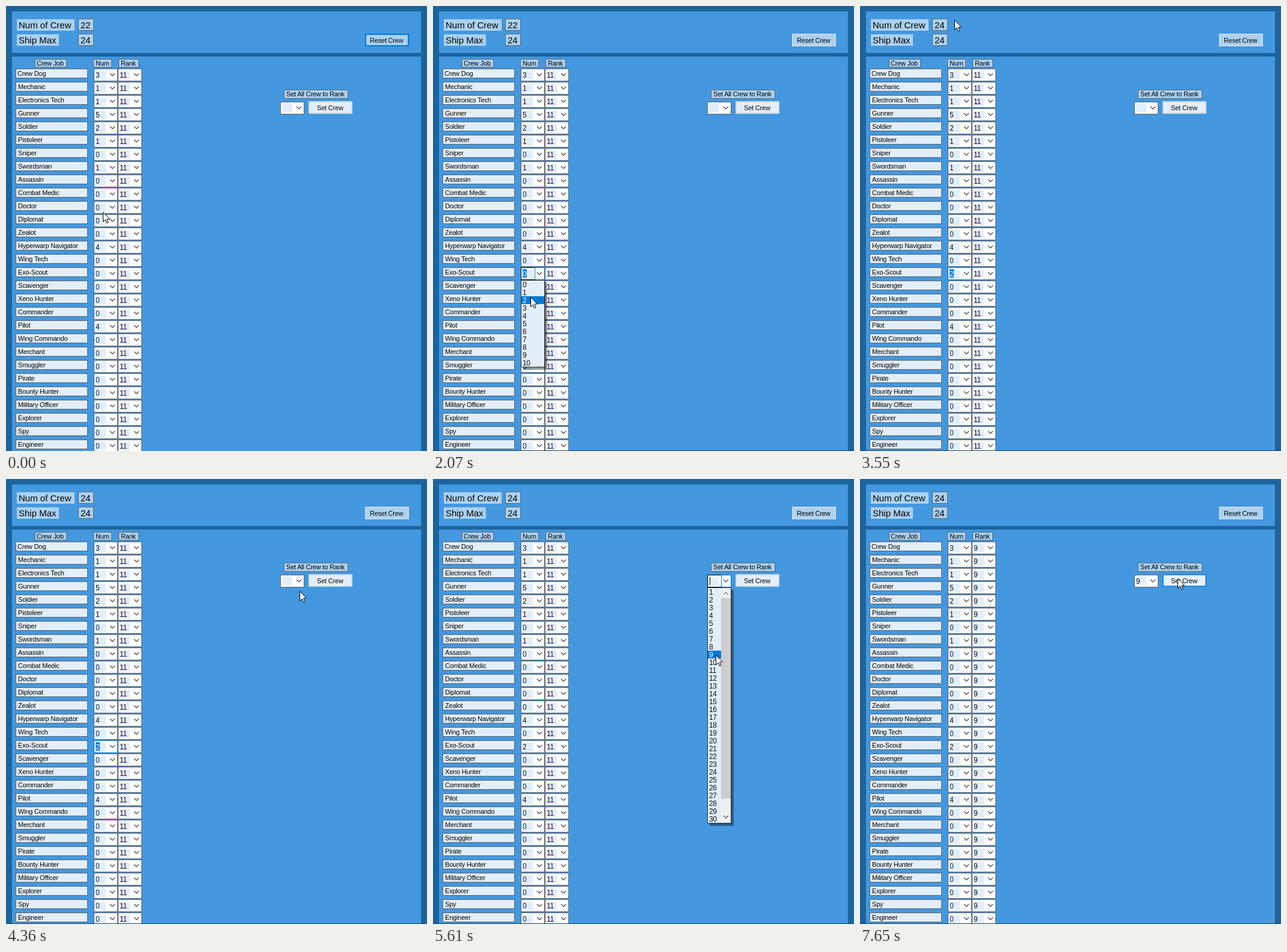
Write an HTML page that moves like this. It is 700 by 739 pixels and loops after 8 s.

```html
<!DOCTYPE html>
<html lang="en">
<head>
<meta charset="utf-8">
<title>Crew editor</title>
<style>
html, body { margin: 0; width: 100%; height: 100%; overflow: hidden; background: #1d649f; }
svg { display: block; }
text { font: 11px "Liberation Sans", Arial, sans-serif; letter-spacing: -0.2px; fill: #000; white-space: pre; }
.big { font-size: 15px; letter-spacing: 0; }
.num { font-size: 12px; letter-spacing: -0.3px; }
</style>
</head>
<body>
<svg id="stage" width="700" height="739" viewBox="0 0 700 739"></svg>
<script>
const LOOP = 8000;
const DARK = "#1d649f", PANEL = "#4398df", LABEL = "#abd1f0", FIELD = "#e2eefa";
const GREY = "#646464", ACCENT = "#0078d7";
const JOBS = ["Crew Dog", "Mechanic", "Electronics Tech", "Gunner", "Soldier", "Pistoleer", "Sniper",
  "Swordsman", "Assassin", "Combat Medic", "Doctor", "Diplomat", "Zealot", "Hyperwarp Navigator",
  "Wing Tech", "Exo-Scout", "Scavenger", "Xeno Hunter", "Commander", "Pilot", "Wing Commando",
  "Merchant", "Smuggler", "Pirate", "Bounty Hunter", "Military Officer", "Explorer", "Spy", "Engineer"];
const COUNTS = { 0: 3, 1: 1, 2: 1, 3: 5, 4: 2, 5: 1, 7: 1, 13: 4, 19: 4 };
const SCOUT = 15, ROW = 22, TOP = 104, ITEM = 13;

// Screen refreshes: first time, last time, number of steps
const BURSTS = [[140, 950, 7], [1260, 2220, 8], [2500, 3400, 8], [3550, 4510, 8],
  [4630, 5610, 8], [5760, 6700, 7], [7110, 7250, 2]];

// Pointer path: time, x, y
const PATH = [[0, 161, 342], [950, 172, 452], [1397, 179, 445], [1535, 179, 445], [2220, 160, 487],
  [2500, 160, 487], [2886, 97, 143], [3015, 110, 50], [3143, 183, 0], [3272, 160, 20], [3400, 124, 11],
  [4236, 514, 150], [4373, 488, 186], [4510, 498, 176], [4630, 504, 170], [4770, 491, 167],
  [5190, 491, 167], [5610, 470, 292], [6074, 470, 292], [6700, 528, 165], [LOOP, 528, 165]];

const stage = document.getElementById("stage");

function el(parent, tag, attrs) {
  const node = document.createElementNS("http://www.w3.org/2000/svg", tag);
  set(node, attrs);
  parent.appendChild(node);
  return node;
}
function set(node, attrs) {
  for (const key in attrs) node.setAttribute(key, attrs[key]);
}
function rect(parent, x, y, width, height, fill) {
  return el(parent, "rect", { x, y, width, height, fill });
}
function frame(parent, x, y, w, h, fill, stroke) {
  const node = rect(parent, x + 0.5, y + 0.5, w - 1, h - 1, fill);
  node.setAttribute("stroke", stroke);
  return node;
}
function text(parent, x, y, str, cls = "") {
  const node = el(parent, "text", { x, y, class: cls });
  node.textContent = str;
  return node;
}
function show(node, on) {
  node.setAttribute("visibility", on ? "visible" : "hidden");
}
function chevron(parent, x, y) {
  el(parent, "path", { d: `M${x - 4} ${y - 2}l4 4l4 -4`, fill: "none", stroke: "#404040", "stroke-width": 1.2 });
}
function label(x, y, w, h, str, tx) {
  frame(stage, x, y, w, h, LABEL, GREY);
  text(stage, tx, y + 11, str);
}

function makeCombo(x, y, value) {
  const box = frame(stage, x, y, 40, 21, "#fff", GREY);
  rect(stage, x + 3, y + 4, 17, 14, FIELD);
  const button = frame(stage, x + 23, y, 17, 21, "#fff", ACCENT);
  const mark = rect(stage, x + 3, y + 3, 7, 14, ACCENT);
  const digits = text(stage, x + 3, y + 14.5, value, "num");
  chevron(stage, x + 31, y + 10);
  const combo = { box, button, mark, digits };
  setCombo(combo, value);
  return combo;
}
function setCombo(c, value, edge = GREY, selected = false, hot = false) {
  value = String(value);
  const ink = value === "0" ? "#06305a" : value[0] === "1" ? "#26083a" : "#08131f";
  if (c.digits.textContent !== value) c.digits.textContent = value;
  c.digits.style.fill = selected ? "#fff" : ink;
  c.box.setAttribute("stroke", edge);
  show(c.mark, selected);
  show(c.button, hot);
}

function makeButton(x, y, str, tx, fill) {
  const box = rect(stage, x + 1, y + 1, 71, 19, fill);
  box.setAttribute("stroke-width", 2);
  text(stage, tx, y + 15, str);
  return box;
}

function makeList(x, y, first, count, bar) {
  const height = count * ITEM + 2;
  const shadow = rect(stage, x + 4, y + 4, 40, 0, "#000");
  shadow.setAttribute("opacity", 0.4);
  const view = el(stage, "svg", { x, y, width: 40, height: 0, overflow: "hidden" });
  const body = el(view, "g", {});
  frame(body, 0, 0, 40, height, FIELD, "#333");
  const bandFill = rect(body, 1, 0, bar ? 22 : 38, ITEM, ACCENT);
  const items = [];
  for (let i = 0; i < count; i++) items.push(text(body, 3, i * ITEM + 11.5, first + i, "num"));
  if (bar) {
    rect(body, 23, 1, 16, height - 2, "#f0f0f0");
    rect(body, 23, 18, 16, height - 59, "#cdcdcd");
    chevron(body, 31, 10);
    chevron(body, 31, height - 11);
    el(body, "path", { d: "M26 6h10v8h-10z", fill: "#f0f0f0" });
    el(body, "path", { d: "M27 12l4 -4l4 4", fill: "none", stroke: "#404040" });
  }
  return { x, y, height, shadow, view, body, bandFill, items };
}
// Opens by sliding its lower part down from under the box
function setList(list, open, part, pointer) {
  show(list.view, open);
  show(list.shadow, open);
  show(list.bandFill, false);
  if (!open) return;
  const shown = Math.round(list.height * Math.min(1, part));
  set(list.view, { height: shown });
  set(list.shadow, { height: shown });
  set(list.body, { transform: `translate(0 ${shown - list.height})` });
  const at = part >= 1 ? Math.floor((pointer.y - list.y - 1) / ITEM) : -1;
  list.items.forEach((item, i) => { item.style.fill = i === at ? "#fff" : "#08131f"; });
  if (at >= 0 && at < list.items.length) {
    show(list.bandFill, true);
    set(list.bandFill, { y: 1 + at * ITEM });
  }
}

// Panels and labels
rect(stage, 0, 0, 700, 739, DARK);
rect(stage, 10, 9, 680, 69, PANEL);
rect(stage, 10, 84, 680, 655, PANEL);
rect(stage, 18, 22, 96, 19, LABEL);
rect(stage, 18, 47, 70, 19, LABEL);
text(stage, 21, 37, "Num of Crew", "big");
text(stage, 21, 62, "Ship Max", "big");
frame(stage, 120, 21, 26, 20, LABEL, GREY);
frame(stage, 120, 46, 26, 20, LABEL, GREY);
const crewTotal = text(stage, 124, 37, "22", "big");
text(stage, 124, 62, "24", "big");
label(48, 88, 53, 14, "Crew Job", 51);
label(145, 88, 31, 14, "Num", 149);
label(187, 88, 34, 14, "Rank", 191);
label(462, 139, 107, 15, "Set All Crew to Rank", 466);
const reset = makeButton(597, 46, "Reset Crew", 605, LABEL);
const apply = makeButton(503, 158, "Set Crew", 517, FIELD);

const nums = [], ranks = [];
JOBS.forEach((job, i) => {
  const y = TOP + i * ROW;
  frame(stage, 16, y, 120, 16, FIELD, GREY);
  text(stage, i ? 20 : 19, y + 12, job);
  nums.push(makeCombo(146, y, COUNTS[i] || 0));
  ranks.push(makeCombo(186, y, 11));
});
const rankPick = makeCombo(456, 159, "");
const caret = rect(stage, 460, 163, 1, 13, "#000");
const footer = rect(stage, 0, 738, 700, 1, "#1b4468");
const numList = makeList(146, TOP + SCOUT * ROW + 21, 0, 11, false);
const rankList = makeList(456, 180, 1, 30, true);
const arrow = el(stage, "path", {
  d: "M.5 .5V16.5L4.2 13L6.6 18.6L9 17.6L6.6 12H11.6Z", fill: "#fff", stroke: "#000"
});

function lastRefresh(t) {
  let time = 0;
  for (const [start, end, steps] of BURSTS) {
    if (t < start) break;
    const gap = (end - start) / (steps - 1);
    time = start + gap * Math.min(steps - 1, Math.floor((t - start) / gap + 0.13));
  }
  return time;
}
function pointerAt(t) {
  const i = Math.max(1, PATH.findIndex(p => p[0] >= t));
  const [t0, x0, y0] = PATH[i - 1], [t1, x1, y1] = PATH[i];
  const u = (t - t0) / (t1 - t0), k = u * u * (3 - 2 * u);
  return { x: Math.round(x0 + (x1 - x0) * k), y: Math.round(y0 + (y1 - y0) * k) };
}

function render(t) {
  const now = lastRefresh(t), p = pointerAt(now);
  const within = (a, b) => now >= a && now < b;

  crewTotal.textContent = now < 2600 ? 22 : 24;
  reset.setAttribute("stroke", now < 1500 ? ACCENT : "#d3d9df");
  show(footer, now >= 1260);

  const over = p.x >= 146 && p.x < 186 ? Math.floor((p.y - TOP) / ROW) : -1;
  nums.forEach((combo, i) => {
    if (i === SCOUT) return;
    const lit = (within(140, 1260) && i === over) || (i === SCOUT + 2 && within(2500, 3010));
    setCombo(combo, COUNTS[i] || 0, lit ? "#111" : GREY);
  });
  const edge = within(1260, 2500) ? "#000" : within(2500, 5180) ? ACCENT : GREY;
  setCombo(nums[SCOUT], now < 2500 ? 0 : 2, edge, within(1380, 4500), within(1260, 2500));
  ranks.forEach(combo => setCombo(combo, now < 7110 ? 11 : 9));

  const picked = now >= 5760;
  setCombo(rankPick, picked ? 9 : "", within(4760, 5760) ? "#000" : GREY,
    within(5760, 7110), within(4760, 6380));
  show(caret, within(4760, 5760));
  setList(numList, within(1440, 2500), (now - 1440) / 166, p);
  setList(rankList, within(4956, 5760), (now - 4956) / 166, p);

  const hot = p.x >= 503 && p.x < 576 && p.y >= 158 && p.y < 179;
  const pressed = within(7110, 7200);
  set(apply, {
    fill: pressed ? "#cce4f7" : hot ? "#e5f1fb" : FIELD,
    stroke: pressed ? "#005499" : hot ? ACCENT : "#d3d9df",
    "stroke-width": hot ? 1.4 : 2
  });

  arrow.setAttribute("transform", `translate(${p.x} ${p.y})`);
  show(arrow, now < 7200 || t >= 7650);
}

const begin = performance.now();
function loop() {
  render((performance.now() - begin) % LOOP);
  requestAnimationFrame(loop);
}
loop();
</script>
</body>
</html>
```
